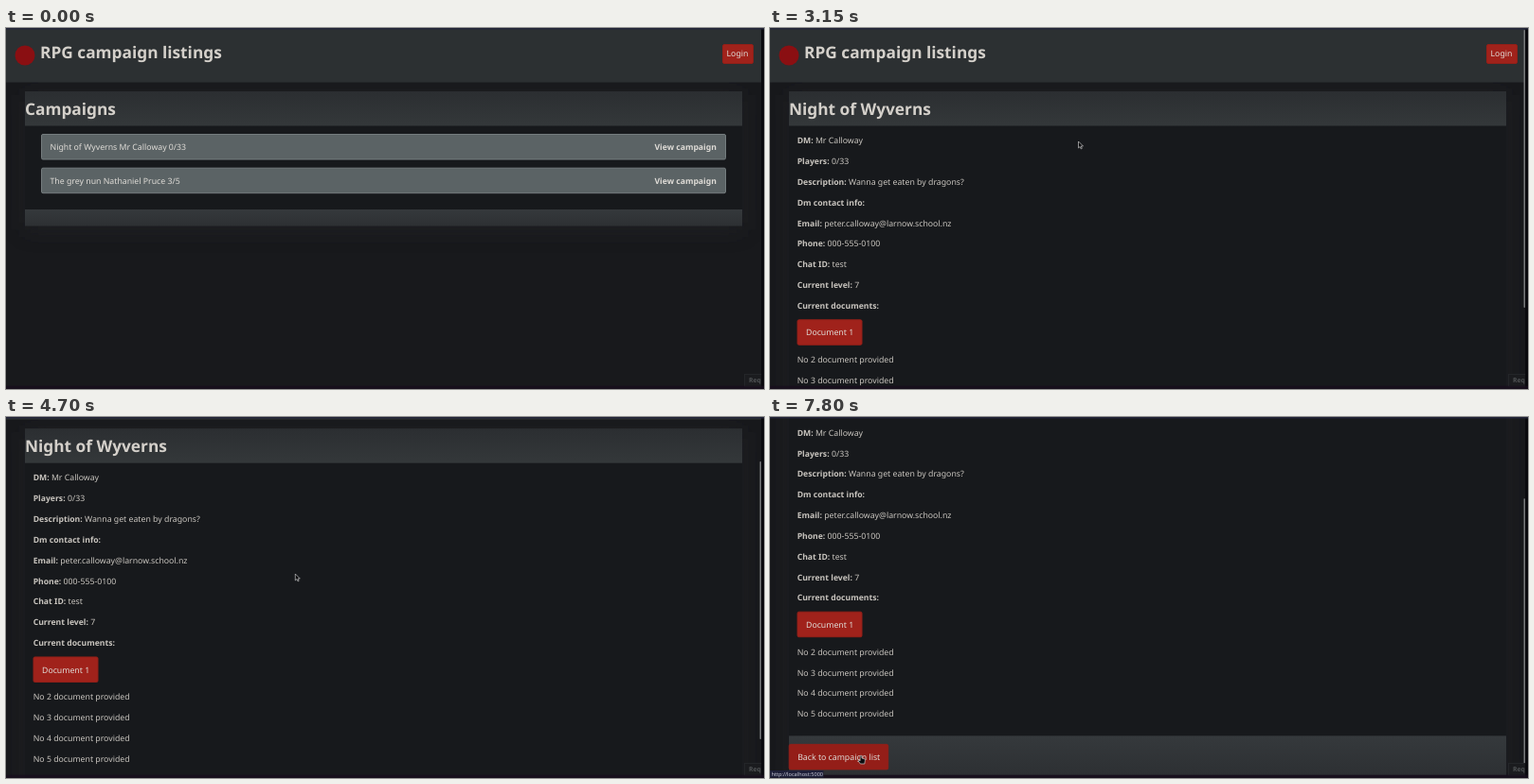
Write an HTML page that moves like this. It is 800x382 px and loops after 8000 ms.

```html
<!DOCTYPE html>
<html lang="en">
<head>
<meta charset="utf-8">
<title>Campaign listings</title>
<style>
html, body { margin: 0; width: 100%; height: 100%; overflow: hidden; background: #18191c; }
svg { display: block; width: 800px; height: 382px; }
text { font: 8.74px "Noto Sans", "Open Sans", sans-serif; fill: #c9c5bf; text-rendering: geometricPrecision; }
.b { font-size: 8.65px; font-weight: 700; }
.h1 { font-size: 17.3px; font-weight: 700; fill: #d4d0ca; }
.light { fill: #dfdcd7; }
.card { fill: #5b6365; stroke: #747c7e; }
.btn { fill: #a0221b; stroke: #931f18; }
.url { font-size: 5.6px; fill: #c6c6d4; }
</style>
</head>
<body>
<svg viewBox="0 0 800 382">
  <defs>
    <linearGradient id="bar" x2="0" y2="1"><stop stop-color="#2b2e31"/><stop offset="1" stop-color="#34383a"/></linearGradient>
    <linearGradient id="foot" x2="0" y2="1"><stop stop-color="#35393c"/><stop offset="1" stop-color="#2d3033"/></linearGradient>
    <filter id="blur" x="-10%" y="-40%" width="120%" height="180%"><feGaussianBlur stdDeviation="11"/></filter>
  </defs>
  <rect width="800" height="382" fill="#18191c"/>
  <g id="page">
    <g id="list"></g>
    <g id="detail"></g>
    <rect width="797" height="57.5" fill="#2c3032"/>
    <circle cx="20" cy="29" r="10.5" fill="#8a0f12"/>
    <text class="h1" x="36" y="31.6">RPG campaign listings</text>
    <rect class="btn" x="756.5" y="17.5" width="32" height="20" rx="1.5"/>
    <text class="light" x="772" y="30.4" text-anchor="middle">Login</text>
  </g>
  <rect id="thumb" x="795.5" width="1.5" height="294" rx=".7" fill="#77797b"/>
  <rect x="779.5" y="366.5" width="20" height="13" fill="#1b1c1f" stroke="#242629"/>
  <text class="b" x="784" y="375.4" style="font-size:6.8px;fill:#505355">Req</text>
  <rect x="797.2" width="2.8" height="382" fill="#08080c"/>
  <rect width="800" height="1.5" fill="#232538"/>
  <rect y="378.7" width="800" height="3.3" fill="#170c1c" opacity=".75"/>
  <g id="status">
    <rect id="tip" y="374" height="7.6" fill="#1e2039"/>
    <text id="url" class="url" x="1.5" y="379.7"></text>
  </g>
  <g id="cursor" fill="#0c0c0e" stroke="#d4d4d4" stroke-width=".65" stroke-linejoin="round">
    <path id="arrow" d="M0 0V7L1.6 5.5L2.7 7.9L3.8 7.4L2.8 5H5Z"/>
    <path id="hand" d="M-.9 .6Q0-.5 .9 .6V3L4 4Q4.6 4.2 4.4 5.2L3.8 9H-.6L-3 5.8Q-2.4 4.6-.9 5.8Z"/>
  </g>
</svg>
<script>
const $ = id => document.getElementById(id);
const text = (x, y, s, cls = "") => `<text class="${cls}" x="${x}" y="${y}">${s}</text>`;
const box = (x, y, w, h, attrs) => `<rect x="${x}" y="${y}" width="${w}" height="${h}" ${attrs}/>`;

const panel = (title, footY, endY) =>
  box(20, 71, 757, endY - 67, 'fill="#25282a" opacity=".5" filter="url(#blur)"') +
  box(20, 103, 757, footY - 103, 'fill="#17191c"') +
  box(20, 67, 757, 36.5, 'fill="url(#bar)"') +
  box(20, footY, 757, endY - footY, 'fill="url(#foot)"') +
  text(20, 92, title, "h1");

const card = (y, label) =>
  box(37.5, y, 722, 26.5, 'class="card" rx="1.5"') +
  text(46.5, y + 16.8, label, "light") +
  text(684.5, y + 16.8, "View campaign", "b light");

const button = (id, x, y, w, label) =>
  box(x, y, w, 26.5, `id="${id}" class="btn" rx="1.5"`) + text(x + 9, y + 16.6, label, "light");

const info = ["DM: Mr Calloway", "Players: 0/33", "Description: Wanna get eaten by dragons?",
  "Dm contact info:", "Email: peter.calloway@larnow.school.nz", "Phone: 000-555-0100",
  "Chat ID: test", "Current level: 7", "Current documents:"];

$("list").innerHTML = panel("Campaigns", 192, 209.5) +
  card(112.5, "Night of Wyverns Mr Calloway 0/33") +
  card(148.2, "The grey nun Nathaniel Pruce 3/5");

$("detail").innerHTML = panel("Night of Wyverns", 440, 481.5) +
  info.map((s, i) => text(28.7, 122.3 + i * 21.83, s.replace(/^.*?:/, '<tspan class="b">$&</tspan>'))).join("") +
  button("doc", 29, 308.8, 68, "Document 1") +
  [2, 3, 4, 5].map(n => text(28.7, 354.3 + (n - 2) * 21.83, `No ${n} document provided`)).join("") +
  button("back", 20.2, 449, 104.5, "Back to campaign list");

// Keys: time, then values
const path = [[550, 791, 203], [600, 758, 202], [650, 722, 201], [850, 722, 201], [1100, 640, 210],
  [1400, 430, 214], [1600, 334, 203], [1650, 331, 193], [1750, 329, 180], [2050, 326, 126],
  [2200, 325.5, 120], [3800, 325.5, 120], [4300, 305.3, 166], [5850, 305.3, 166], [6300, 195, 285],
  [6650, 122, 338], [6800, 130.6, 325], [6950, 156, 304], [7200, 135, 336], [7500, 104, 363], [7800, 96, 358]];
const scrolls = [[4350, 0], [4700, 54.8], [4750, 56], [5150, 102.6]];

function at(keys, t) {
  if (t <= keys[0][0]) return keys[0].slice(1);
  const i = keys.findIndex(k => k[0] > t);
  if (i < 0) return keys[keys.length - 1].slice(1);
  const [a, b] = [keys[i - 1], keys[i]];
  const u = (t - a[0]) / (b[0] - a[0]);
  return a.slice(1).map((v, j) => v + (b[j + 1] - v) * u);
}
const show = (id, on) => $(id).style.display = on ? "" : "none";
const within = (v, lo, hi) => v >= lo && v <= hi;
const fade = (t, start) => Math.max(0, Math.min(1, (t - start) / 150));

function draw(t) {
  const onDetail = t >= 2950;
  const [scroll] = at(scrolls, t);
  const [x, y] = at(path, t);
  const overBack = onDetail && within(x, 20, 125) && within(y + scroll, 449, 476);
  const overCard = !onDetail && (within(y, 112, 139) || within(y, 148, 175));

  show("list", !onDetail);
  show("detail", onDetail);
  show("thumb", onDetail);
  $("page").setAttribute("transform", `translate(0 ${-scroll})`);
  $("thumb").setAttribute("y", 2 + scroll * .82);
  $("back").style.fill = overBack ? "#941e18" : "";

  show("cursor", t >= 550);
  $("cursor").setAttribute("transform", `translate(${x} ${y})`);
  show("hand", overBack || overCard);
  show("arrow", !(overBack || overCard));

  $("url").textContent = "http://localhost:5000" + (onDetail ? "" : "/campaign/1");
  $("tip").setAttribute("width", onDetail ? 56.5 : 87);
  $("status").style.opacity = onDetail ? fade(t, 7600) : fade(t, 2300);
}

function tick(now) {
  draw(now % 8000);
  requestAnimationFrame(tick);
}
draw(0);
requestAnimationFrame(tick);
</script>
</body>
</html>
```
